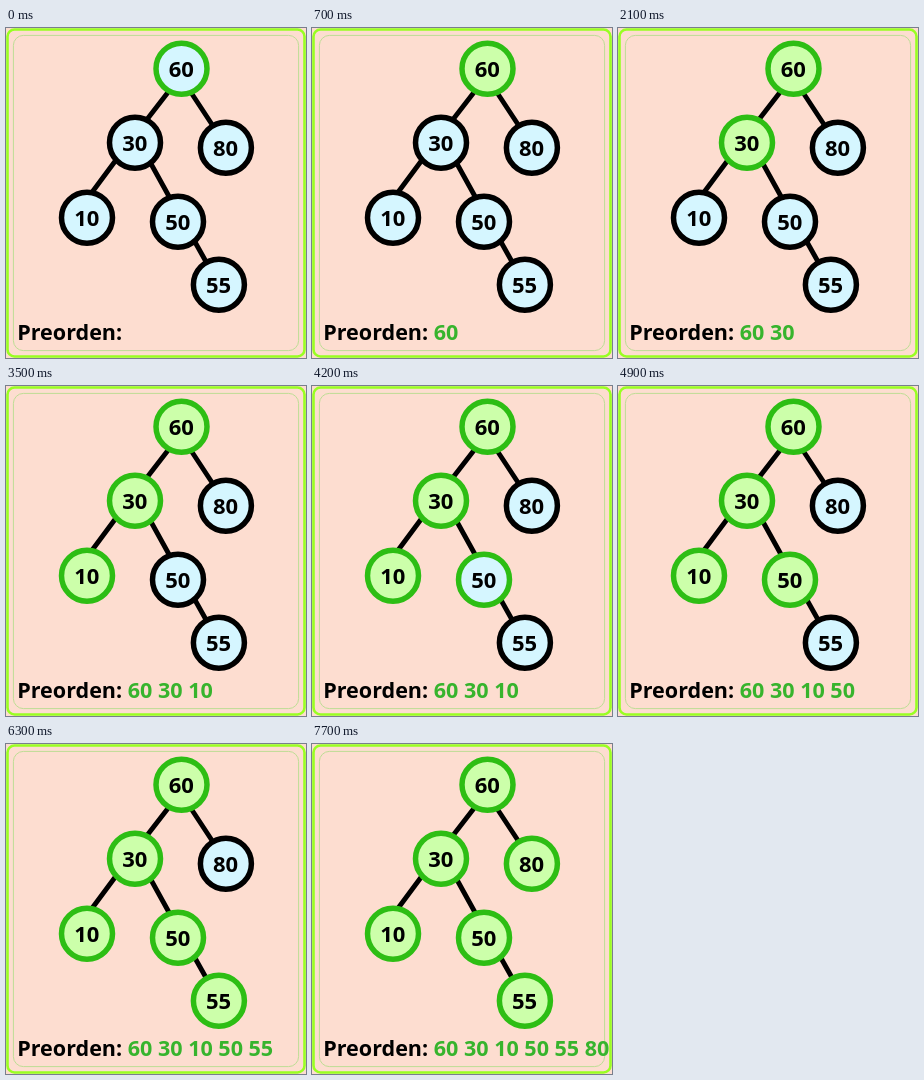
These frames come from a looping animation (300 by 330 pixels, 8400 ms). An HTML page with a canvas:

```html
<!DOCTYPE html>
<html lang="es">
<head>
<meta charset="utf-8">
<title>Preorden</title>
<style>
html, body { margin: 0; width: 100%; height: 100%; overflow: hidden; background: #fdddd0; }
canvas { display: block; }
</style>
</head>
<body>
<canvas id="stage"></canvas>
<script>
const W = 300, H = 330, STEP = 700, STEPS = 12;
const FAMILY = '"Open Sans", "Noto Sans", sans-serif';
const NODE_FONT = `bold 22px ${FAMILY}`;
const CAPTION_FONT = `bold 21.55px ${FAMILY}`;
const GREEN = '#2dbe14';

// Nodes in visiting order
const nodes = [
  { label: '60', x: 175.5, y: 40.7 },
  { label: '30', x: 129, y: 114.7 },
  { label: '10', x: 81, y: 189.7 },
  { label: '50', x: 172, y: 193.7 },
  { label: '55', x: 212.9, y: 256.7 },
  { label: '80', x: 219.9, y: 119.7 }
];
const edges = [
  [163, 63, 139, 94],
  [184, 63, 209, 101],
  [110, 132, 84, 167],
  [144, 134, 165, 172],
  [187.3, 211, 201.3, 236]
];

const canvas = document.getElementById('stage');
const ctx = canvas.getContext('2d');
const ratio = window.devicePixelRatio || 1;
canvas.width = W * ratio;
canvas.height = H * ratio;
canvas.style.width = W + 'px';
canvas.style.height = H + 'px';
ctx.scale(ratio, ratio);

function frame(inset, radius, color, width) {
  ctx.beginPath();
  ctx.roundRect(inset, inset, W - 2 * inset, H - 2 * inset, radius);
  ctx.strokeStyle = color;
  ctx.lineWidth = width;
  ctx.stroke();
}

function drawEdges() {
  ctx.strokeStyle = '#000';
  ctx.lineWidth = 4.9;
  ctx.beginPath();
  for (const [x1, y1, x2, y2] of edges) {
    ctx.moveTo(x1, y1);
    ctx.lineTo(x2, y2);
  }
  ctx.stroke();
}

function drawNode({ label, x, y }, reached, visited) {
  ctx.beginPath();
  ctx.arc(x, y, 25.5, 0, 2 * Math.PI);
  ctx.fillStyle = visited ? '#ccffaa' : '#d5f6ff';
  ctx.fill();
  ctx.strokeStyle = reached ? GREEN : '#000';
  ctx.lineWidth = 5.5;
  ctx.stroke();
  ctx.font = NODE_FONT;
  ctx.textAlign = 'center';
  ctx.fillStyle = '#000';
  ctx.fillText(label, x - 0.3, y + 7.8);
}

function drawCaption(count) {
  const title = 'Preorden: ', x = 11.2, y = 312;
  ctx.font = CAPTION_FONT;
  ctx.textAlign = 'left';
  ctx.fillStyle = '#000';
  ctx.fillText(title, x, y);
  ctx.fillStyle = '#37b42d';
  const list = nodes.slice(0, count).map(n => n.label).join(' ');
  ctx.fillText(list, x + ctx.measureText(title).width, y);
}

function draw(now) {
  const step = Math.floor(now / STEP) % STEPS;
  const reached = Math.floor(step / 2) + 1;
  const visited = Math.floor((step + 1) / 2);

  ctx.fillStyle = '#fdddd0';
  ctx.fillRect(0, 0, W, H);
  frame(1.5, 7, '#99ff22', 2.6);
  frame(7.4, 10, '#bddd94', 1);
  drawEdges();
  nodes.forEach((n, i) => drawNode(n, i < reached, i < visited));
  drawCaption(visited);
}

const start = performance.now();
function tick() {
  draw(performance.now() - start);
  requestAnimationFrame(tick);
}
tick();
</script>
</body>
</html>
```
